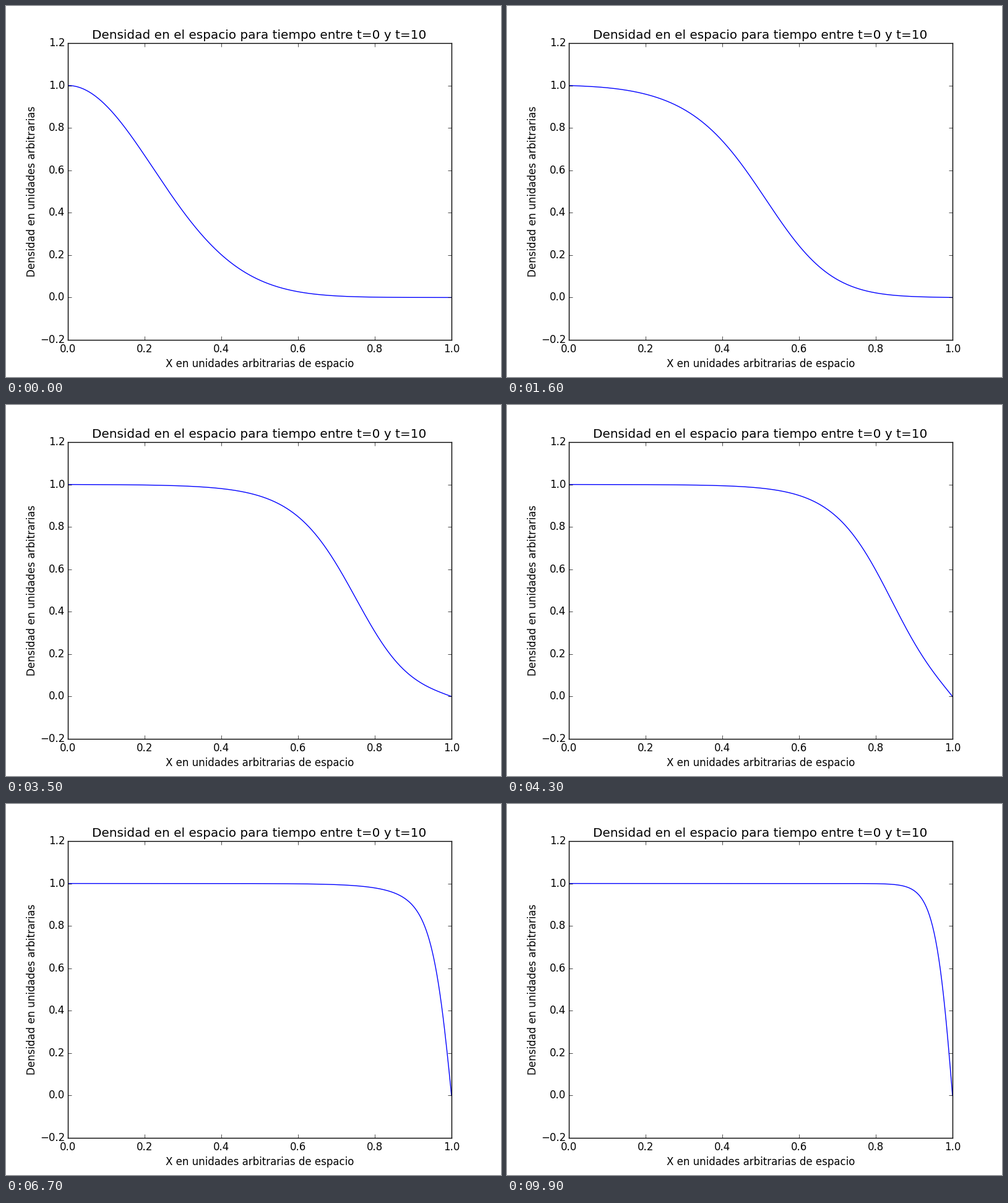
Animation of 800x600 px, one loop 10 s. Source, as a matplotlib script:

```python
import matplotlib.pyplot as plt
import numpy as np
from matplotlib.animation import FuncAnimation

plt.style.use("classic")
plt.rcParams.update({
    "font.family": "DejaVu Sans",
    "figure.facecolor": "white",
    "savefig.facecolor": "white",
    "figure.dpi": 100,
    "savefig.dpi": 100,
    "ytick.major.pad": 3.2,
})

FRAMES, INTERVAL = 100, 100
POINTS = 501
GAMMA, MU = 0.001, 1.5
DT = 10 / (FRAMES - 1)  # the frames span t=0 to t=10, both included


def solve(x):
    """Fisher-KPP: Crank-Nicolson diffusion with an explicit reaction term."""
    h = x[1] - x[0]
    r = GAMMA * DT / (2 * h**2)
    inner = len(x) - 2
    lap = np.eye(inner, k=1) + np.eye(inner, k=-1) - 2 * np.eye(inner)
    implicit = np.linalg.inv(np.eye(inner) - r * lap)

    n = np.exp(-x**2 / 0.1)
    n[0], n[-1] = 1, 0
    history = [n]
    for _ in range(FRAMES - 1):
        mid = n[1:-1]
        rhs = mid + r * (n[2:] - 2 * mid + n[:-2]) + DT * MU * mid * (1 - mid)
        rhs[0] += r * n[0]
        rhs[-1] += r * n[-1]
        n = np.concatenate(([1.0], implicit @ rhs, [0.0]))
        history.append(n)
    return history


x = np.linspace(0, 1, POINTS)
density = solve(x)

fig, ax = plt.subplots(figsize=(8, 6), dpi=100)
line, = ax.plot(x, density[0], color="blue", linewidth=1)
ax.set_xlim(0, 1)
ax.set_ylim(-0.2, 1.2)
ax.set_xticks(np.linspace(0, 1, 6))
ax.set_yticks(np.linspace(-0.2, 1.2, 8).round(1))
ax.set_title("Densidad en el espacio para tiempo entre t=0 y t=10", x=0.4992)
ax.set_xlabel("X en unidades arbitrarias de espacio")
ax.set_ylabel("Densidad en unidades arbitrarias", labelpad=3.4)


def update(i):
    line.set_ydata(density[i])
    return line,


anim = FuncAnimation(fig, update, frames=FRAMES, interval=INTERVAL,
                     repeat=True, repeat_delay=0)
plt.show()
```
